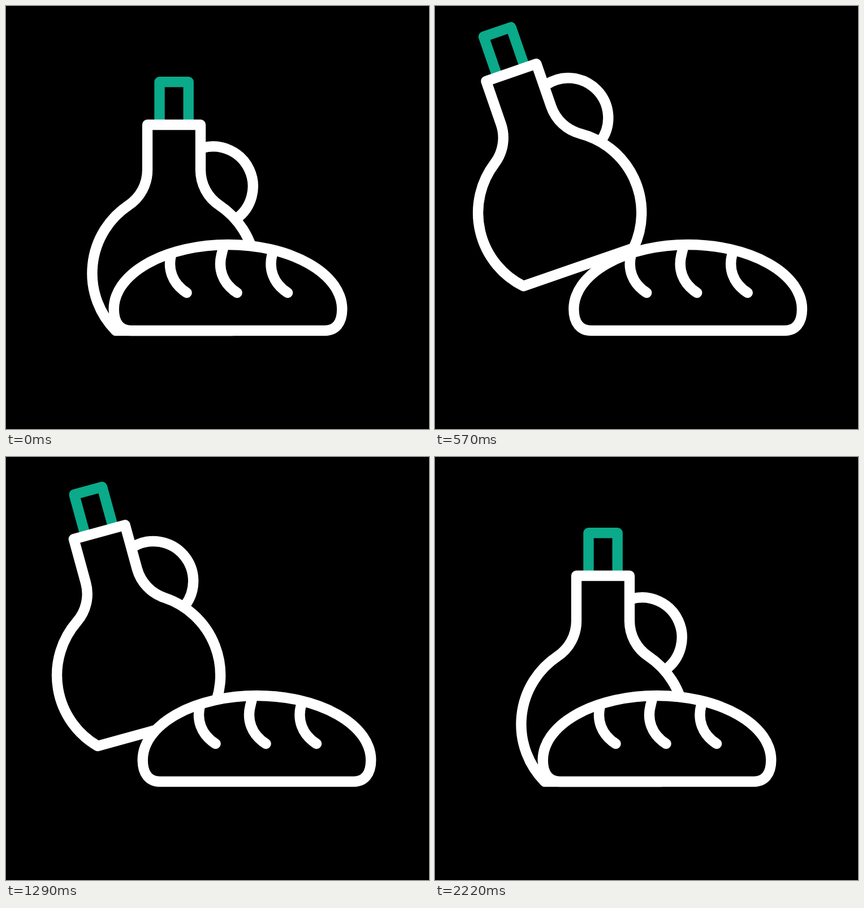
An HTML page that plays this animation: 748x748 px, repeating every 2.35 s.

```html
<!DOCTYPE html>
<html lang="en">
<head>
<meta charset="utf-8">
<title>Jug and loaf</title>
<style>
  html, body { margin: 0; width: 100%; height: 100%; overflow: hidden; background: #000; }
  svg { display: block; width: 100%; height: 100%; }
</style>
</head>
<body>
<svg viewBox="0 0 748 748" fill="none" stroke="#fff" stroke-width="18.4" stroke-linejoin="round">
  <g id="jug">
    <path stroke="#0aaa8a" d="M271.5 208V134.3H322.7V208"/>
    <path d="M348 250.8A70.5 70.5 0 0 1 407 376.4"/>
    <path d="M250 210V290A75 75 0 0 1 216.7 352.4A144.5 144.5 0 0 0 194 574H400A144.5 144.5 0 0 0 377.3 352.4A75 75 0 0 1 344 290V210Z"/>
  </g>
  <g id="loaf">
    <path fill="#000" d="M221 574C203 574 190.7 561 190.7 536A201.8 114 0 0 1 594.3 536C594.3 561 582 574 564 574Z"/>
    <g stroke-linecap="round">
      <path id="cut" d="M292 440C286 464 293 490 319.5 507"/>
      <use href="#cut" x="89"/>
      <use href="#cut" x="178.5"/>
      <path d="M381 440L384 428"/>
    </g>
  </g>
</svg>
<script>
const LOOP = 2350, STEP = 30, LAST = 2220;
const TOP = 880, LAND = 1525, ROCK = 1890;
const TILT = 22.15, ROCK_TILT = -6, SLIDE = 62.3;
const PIVOT = [400, 574];

const jug = document.getElementById('jug');
const loaf = document.getElementById('loaf');
const span = (t, a, b) => Math.min(1, Math.max(0, (t - a) / (b - a)));

// Cubic easing with level ends and handles at x = a and x = b
function ease(u, a, b) {
  let lo = 0, hi = 1;
  for (let i = 0; i < 30; i++) {
    const s = (lo + hi) / 2, r = 1 - s;
    const x = 3 * s * r * r * a + 3 * s * s * r * b + s * s * s;
    if (x < u) lo = s; else hi = s;
  }
  return lo * lo * (3 - 2 * lo);
}

function tiltAt(t) {
  if (t < TOP) return TILT * ease(span(t, 0, TOP), 0.273, 0.398);
  if (t < LAND) return TILT * (1 - Math.pow(span(t, TOP, LAND), 2.6));
  if (t < ROCK) return ROCK_TILT * ease(span(t, LAND, ROCK), 0.25, 0.5);
  return ROCK_TILT * (1 - Math.pow(span(t, ROCK, LAST), 1.85));
}

function slideAt(t) {
  if (t < TOP) return SLIDE * ease(span(t, 0, TOP), 0.3, 0.341);
  return SLIDE * (1 - ease(span(t, TOP, 1830), 0.72, 0.62));
}

function draw(t) {
  const tilt = tiltAt(t), lift = Math.max(0, tilt);
  jug.setAttribute('transform',
    `translate(${-2.56 * lift} ${-7.66 * lift}) rotate(${-tilt} ${PIVOT})`);
  loaf.setAttribute('transform', `translate(${slideAt(t)} 0)`);
}

function tick() {
  const t = performance.now() % LOOP;
  draw(Math.min(LAST, Math.floor(t / STEP) * STEP));
  requestAnimationFrame(tick);
}
tick();
</script>
</body>
</html>
```
